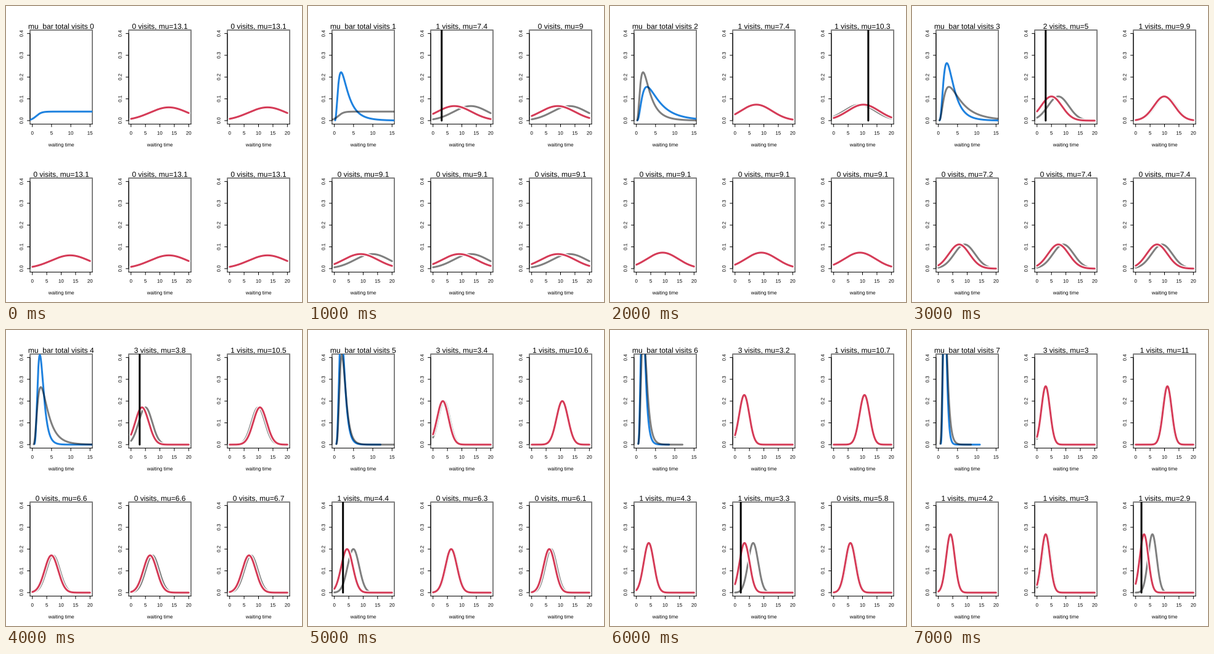
Recreate the animation shown at these times as a matplotlib script. Size 480 by 480 pixels, loop 8000 ms.

```python
import numpy as np
import matplotlib as mpl
import matplotlib.pyplot as plt
from matplotlib.animation import FuncAnimation
from matplotlib.patches import PathPatch
from matplotlib.textpath import TextPath
from matplotlib.transforms import Affine2D

mpl.rcParams.update({
    "font.family": "Liberation Sans",
    "path.snap": False,
    "toolbar": "None",
})

SIZE, DPI = 480, 100
PX = 72 / DPI              # one pixel in points
LINE = 9.504               # one margin line in pixels
CELL_W, CELL_H = 160, 240
LEFT, TOP = 4.1 * LINE, 4.1 * LINE
RIGHT, BOTTOM = CELL_W - 2.1 * LINE, CELL_H - 5.1 * LINE
YLIM = (-0.016, 0.416)
RED, BLUE = "#d53b57", "#1f82df"

# Per step: peak height, place visited, time waited, mean of each place
STEPS = [
    (.061, None, 0, (13.1, 13.1, 13.1, 13.1, 13.1)),
    (.067, 0, 3, (7.4, 9, 9.1, 9.1, 9.1)),
    (.0735, 1, 12, (7.4, 10.3, 9.1, 9.1, 9.1)),
    (.111, 0, 3, (5, 9.9, 7.2, 7.4, 7.4)),
    (.171, 0, 3, (3.8, 10.5, 6.6, 6.6, 6.7)),
    (.2, 2, 3, (3.4, 10.6, 4.4, 6.3, 6.1)),
    (.228, 3, 2, (3.2, 10.7, 4.3, 3.3, 5.8)),
    (.268, 4, 2, (3, 11, 4.2, 3, 2.9)),
]
X = np.linspace(0, 20, 300)


def bell(mu, peak):
    return peak * np.exp(-np.pi * (peak * (X - mu)) ** 2)


def plateau(height, middle, scale):
    x = np.linspace(-1, 16, 300)
    return x, height / (1 + np.exp((middle - x) / scale))


def skewed(peak, mode, spread, end):
    """Bell on a log scale, running from its left foot to end."""
    x = np.linspace(mode * np.exp(-3.2 * spread), end, 500)
    return x, peak * np.exp(-.5 * (np.log(x / mode) / spread) ** 2)


# Density of the overall mean after each visit
OVERALL = [
    plateau(.0415, 1, .7),
    skewed(.222, 1.75, .67, 16),
    skewed(.155, 2.75, .72, 16),
    skewed(.264, 2.2, .58, 16),
    skewed(.412, 1.95, .4, 16),
    skewed(.53, 1.8, .39, 12),
    skewed(.64, 1.6, .36, 8.5),
    skewed(.72, 1.6, .28, 10.8),
]

fig = plt.figure(figsize=(SIZE / DPI, SIZE / DPI), dpi=DPI, facecolor="white")
base = fig.add_axes([0, 0, 1, 1])
base.set(xlim=(0, SIZE), ylim=(SIZE, 0))
base.axis("off")


def rule(xs, ys, color="black", width=1):
    base.plot(xs, ys, color=color, lw=width * PX, solid_capstyle="butt")


class Label:
    """Outline text centred on a baseline point, free of pixel rounding."""

    def __init__(self, x, y, text="", size=7.92, angle=0):
        self.x, self.y, self.size, self.angle = x, y, size, angle
        self.patch = PathPatch(TextPath((0, 0), " "), fc="black", lw=0)
        base.add_patch(self.patch)
        if text:
            self.set(text)

    def set(self, text):
        path = TextPath((0, 0), text, size=self.size)
        box = path.get_extents()
        place = (Affine2D().translate(-(box.x0 + box.x1) / 2, 0).scale(1, -1)
                 .rotate_deg(-self.angle).translate(self.x, self.y))
        self.patch.set_path(place.transform_path(path))


class Panel:
    def __init__(self, index, xmax):
        ox, oy = index % 3 * CELL_W, index // 3 * CELL_H
        l, r, t, b = ox + LEFT, ox + RIGHT, oy + TOP, oy + BOTTOM
        xlim = (-.04 * xmax, 1.04 * xmax)
        mid = (l + r) / 2

        def px(v):
            return l + (v - xlim[0]) / (xlim[1] - xlim[0]) * (r - l)

        def py(v):
            return b - (v - YLIM[0]) / (YLIM[1] - YLIM[0]) * (b - t)

        # The frame edges fall between pixels, so they read as soft grey
        x0, x1, y0 = round(l), round(r), round(t)
        rule([x0, x0, x1, x1], [b, y0, y0, b], "0.5", 2)
        rule([l - .5, r + .5], [b, b])

        tick = LINE / 2
        for v in range(0, xmax + 1, 5):
            rule([px(v)] * 2, [b, b + tick])
            Label(px(v), b + 1.8 * LINE, str(v))
        rule([l, l], [py(0), py(.4)])
        for k in range(5):
            y = py(k / 10)
            rule([l, l - tick], [y, y])
            Label(l - 1.2 * LINE, y, f"{k / 10:.1f}", angle=90)
        Label(mid, b + 3.8 * LINE, "waiting time")
        self.title = Label(mid, t - .2 * LINE, size=12)

        self.ax = fig.add_axes([l / SIZE, 1 - b / SIZE, (r - l) / SIZE, (b - t) / SIZE])
        self.ax.set(xlim=xlim, ylim=YLIM)
        self.ax.axis("off")

    def curve(self, color, width=3, alpha=1):
        return self.ax.plot([], [], color=color, lw=width * PX, alpha=alpha,
                            solid_capstyle="round", solid_joinstyle="round")[0]


overall = Panel(0, 15)
now = overall.curve(BLUE)
before = overall.curve("black", alpha=.5)

places = [Panel(i, 20) for i in range(1, 6)]
for p in places:
    p.old = p.curve("black", alpha=.5)
    p.halo = p.curve("white", 6)
    p.new = p.curve(RED)
    p.wait = p.curve("black")


def draw(step):
    peak, visited, waited, means = STEPS[step]
    last = max(step - 1, 0)
    overall.title.set(f"mu_bar total visits {step}")
    now.set_data(*OVERALL[step])
    before.set_data(*OVERALL[last])
    before.set_visible(step > 0)
    for i, p in enumerate(places):
        visits = sum(s[1] == i for s in STEPS[:step + 1])
        p.title.set(f"{visits} visits, mu={means[i]:g}")
        p.new.set_data(X, bell(means[i], peak))
        p.halo.set_data(X, bell(means[i], peak))
        p.old.set_data(X, bell(STEPS[last][3][i], peak))
        p.old.set_visible(step > 0)
        p.wait.set_data([waited, waited], [0, 1])
        p.wait.set_visible(i == visited)
    return []


anim = FuncAnimation(fig, draw, frames=len(STEPS), interval=1000,
                     init_func=lambda: draw(0), repeat=True, repeat_delay=0)
plt.show()
```
